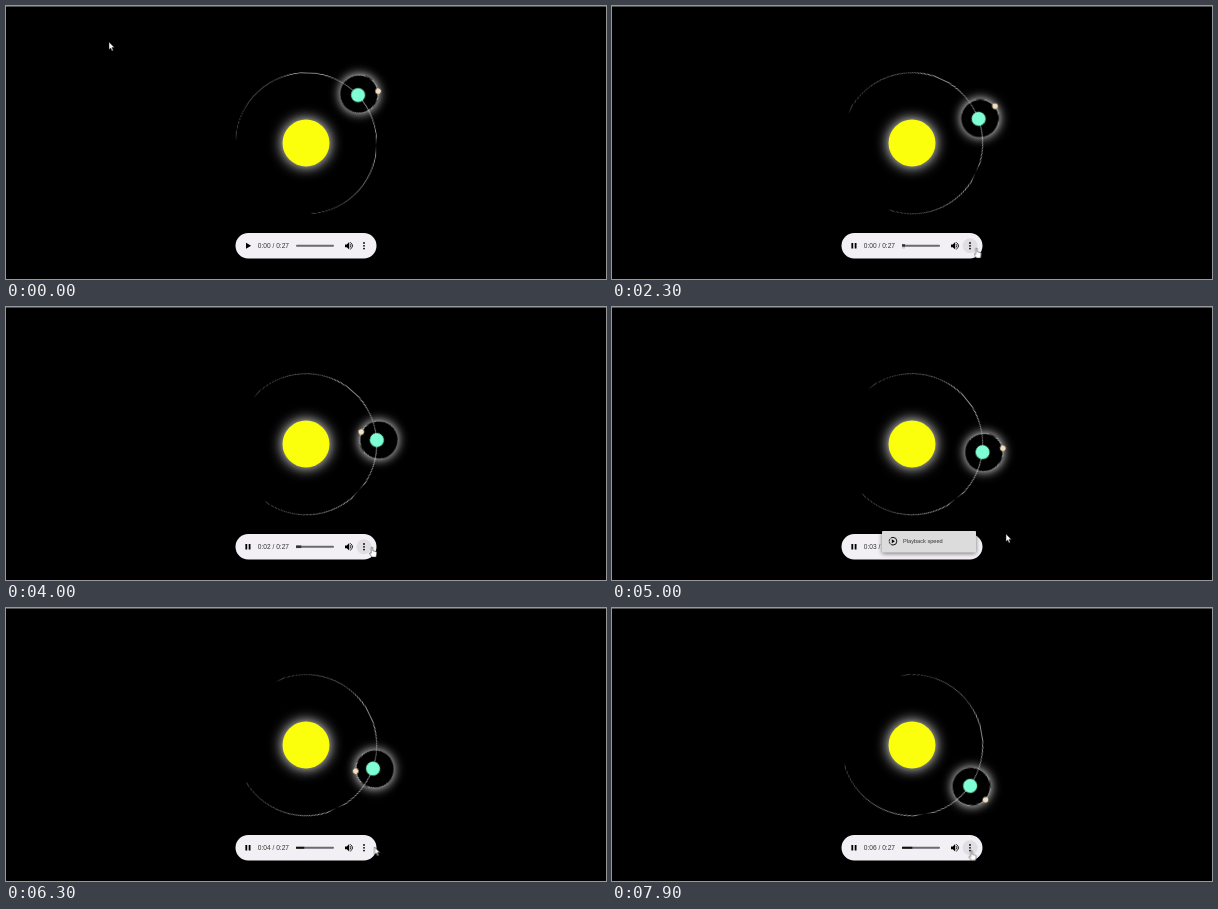
An HTML page for the animation above (8000 ms loop, 600 px wide and 273 px high).

```html
<!DOCTYPE html>
<html lang="en">
<head>
<meta charset="utf-8">
<title>Solar system</title>
<style>
html, body { margin: 0; width: 100%; height: 100%; overflow: hidden; background: #000; }
#stage { position: relative; width: 600px; height: 273px; overflow: hidden; background: #000; }
#stage::before { content: ""; position: absolute; width: 100%; height: 1px; background: #505050; }

/* Orbits, built at 10px per em and scaled down */
.system {
  position: absolute; left: 100px; top: -62.6px; width: 40em; height: 40em;
  font-size: 10px; transform: scale(.47);
}
.sun, .orbit, .orbit::before { position: absolute; border-radius: 50%; }
.sun {
  top: 15em; left: 15em; width: 10em; height: 10em;
  background: #fbff0c; box-shadow: 0 0 3em white;
}
.orbit { border: solid white; border-width: .1em .1em 0 0; }
.orbit::before { content: ""; }
.earth { top: 5em; left: 5em; width: 30em; height: 30em; animation: earth 8s steps(80) infinite; }
.earth::before { top: 2.8em; right: 2.8em; width: 3em; height: 3em; background: aquamarine; }
.moon {
  top: 0; right: 0; width: 8em; height: 8em;
  box-shadow: 0 0 2.2em white; animation: moon 8s steps(80) infinite;
}
.moon::before { top: .8em; right: .2em; width: 1.2em; height: 1.2em; background: #f3dfbd; }
@keyframes earth { from { transform: rotate(2.1deg); } to { transform: rotate(81deg); } }
@keyframes moon { from { transform: rotate(28.6deg); } to { transform: rotate(1095.3deg); } }

/* Player */
svg { position: absolute; inset: 0; }
text { font-family: "Liberation Sans", Arial, sans-serif; fill: #333; }
.switch { animation: 8s step-end infinite; }
.play { animation-name: play; }
.pause { animation-name: pause; }
.on-play { animation-name: on-play; }
.on-more { animation-name: on-more; }
.menu { animation-name: menu; }
.hand { animation-name: hand; }
.arrow { animation-name: arrow; }
.played { transform-origin: 290px 0; animation: played 8s linear infinite; }
.cursor { animation: cursor 8s linear infinite; }

@keyframes play { 0% { opacity: 1; } 17.5%, 100% { opacity: 0; } }
@keyframes pause { 0% { opacity: 0; } 17.5%, 100% { opacity: 1; } }
@keyframes on-play { 0%, 20%, 100% { opacity: 0; } 10% { opacity: 1; } }
@keyframes on-more {
  0%, 36.25%, 58.75% { opacity: 0; }
  26.25%, 45%, 88.75%, 100% { opacity: 1; }
}
@keyframes menu { 0%, 65%, 100% { opacity: 0; } 57.5% { opacity: 1; } }
@keyframes hand {
  0%, 20%, 36.25%, 58.75% { opacity: 0; }
  10%, 26.25%, 45%, 88.75%, 100% { opacity: 1; }
}
@keyframes arrow {
  0%, 20%, 36.25%, 58.75% { opacity: 1; }
  10%, 26.25%, 45%, 88.75%, 100% { opacity: 0; }
}
@keyframes played {
  0%, 17.49% { transform: scaleX(0); }
  17.5% { transform: scaleX(.05); animation-timing-function: steps(66); }
  100% { transform: scaleX(.28); }
}
@keyframes cursor {
  0% { transform: translate(103px, 36px); animation-timing-function: steps(9); }
  11.25% { transform: translate(245px, 246px); }
  18.75% { transform: translate(245px, 246px); animation-timing-function: steps(7); }
  27.5%, 35% { transform: translate(364.5px, 242px); animation-timing-function: steps(5); }
  41.25% { transform: translate(404px, 243px); animation-timing-function: steps(4); }
  46.25% { transform: translate(366px, 240px); }
  57.5% { transform: translate(366px, 240px); animation-timing-function: steps(4); }
  62.5%, 65% { transform: translate(394px, 227px); animation-timing-function: steps(5); }
  71.25% { transform: translate(369px, 238px); }
  78.75% { transform: translate(368.5px, 239px); animation-timing-function: steps(10); }
  91.25% { transform: translate(362px, 241px); animation-timing-function: steps(6); }
  98.75%, 100% { transform: translate(359.5px, 242.5px); }
}
</style>
</head>
<body>
<div id="stage">
  <div class="system">
    <div class="sun"></div>
    <div class="orbit earth"><div class="orbit moon"></div></div>
  </div>
  <svg width="600" height="273" viewBox="0 0 600 273">
    <rect x="229.5" y="227" width="141" height="25.4" rx="12.7" fill="#f2f0f4"/>
    <circle class="switch on-play" cx="241.5" cy="239.8" r="7.5" fill="#e2e0e4"/>
    <circle class="switch on-more" cx="358" cy="239.8" r="7.5" fill="#e0dee2"/>
    <path class="switch play" d="M240 236.8l5.1 3-5.1 3z"/>
    <path class="switch pause" d="M239.4 237h1.8v5.6h-1.8zM242.7 237h1.8v5.6h-1.8z"/>
    <text id="time" x="251.8" y="242.1" font-size="6.6">0:00 / 0:27</text>
    <rect x="290" y="238.8" width="38" height="1.9" rx=".9" fill="#6b6a6d"/>
    <rect class="played" x="290" y="238.8" width="38" height="1.9" fill="#111"/>
    <path d="M339 238.4h1.8l2.4-2.3v7.4l-2.4-2.3H339z"/>
    <path d="M344.2 238.2q1.5 1.6 0 3.2M344.2 236.3q4.8 3.5 0 7" fill="none" stroke="#000" stroke-width=".85"/>
    <path d="M358 237v0M358 239.8v0M358 242.6v0" stroke="#000" stroke-width="1.8" stroke-linecap="round"/>
    <g class="switch menu">
      <rect x="270" y="224" width="94" height="21.5" rx="1" fill="#dcdcdc" style="filter: drop-shadow(0 1px 2px #0008)"/>
      <g fill="none" stroke="#111">
        <path d="M281 230.4a3.8 3.8 0 0 1 0 7.6"/>
        <path d="M281 238a3.8 3.8 0 0 1 0-7.6" stroke-dasharray="2.4 .7"/>
      </g>
      <path d="M279.8 232.2l3.1 2-3.1 2z"/>
      <text x="291" y="236.2" font-size="5.64">Playback speed</text>
    </g>
    <g class="cursor" fill="#fff" stroke="#222" stroke-width=".5" stroke-linejoin="round">
      <path class="switch arrow" d="M0 0v7.6l1.7-1.5 1.3 2.8 1.2-.6-1.3-2.7h2.4z"/>
      <path class="switch hand" d="M-.8.5q.8-1 1.6 0v3.3l3.2.8q.9.3.8 1.3l-.7 4.2H0L-2.6 6.5q-.1-1.2 1.8-.2z"/>
    </g>
  </svg>
</div>
<script>
const label = document.getElementById("time");
let start;

function tick(now) {
  start ??= now;
  const t = (now - start) % 8000;
  const sec = Math.max(0, Math.floor((t - 1400) / 1000));
  label.textContent = `0:0${sec} / 0:27`;
  requestAnimationFrame(tick);
}
requestAnimationFrame(tick);
</script>
</body>
</html>
```
